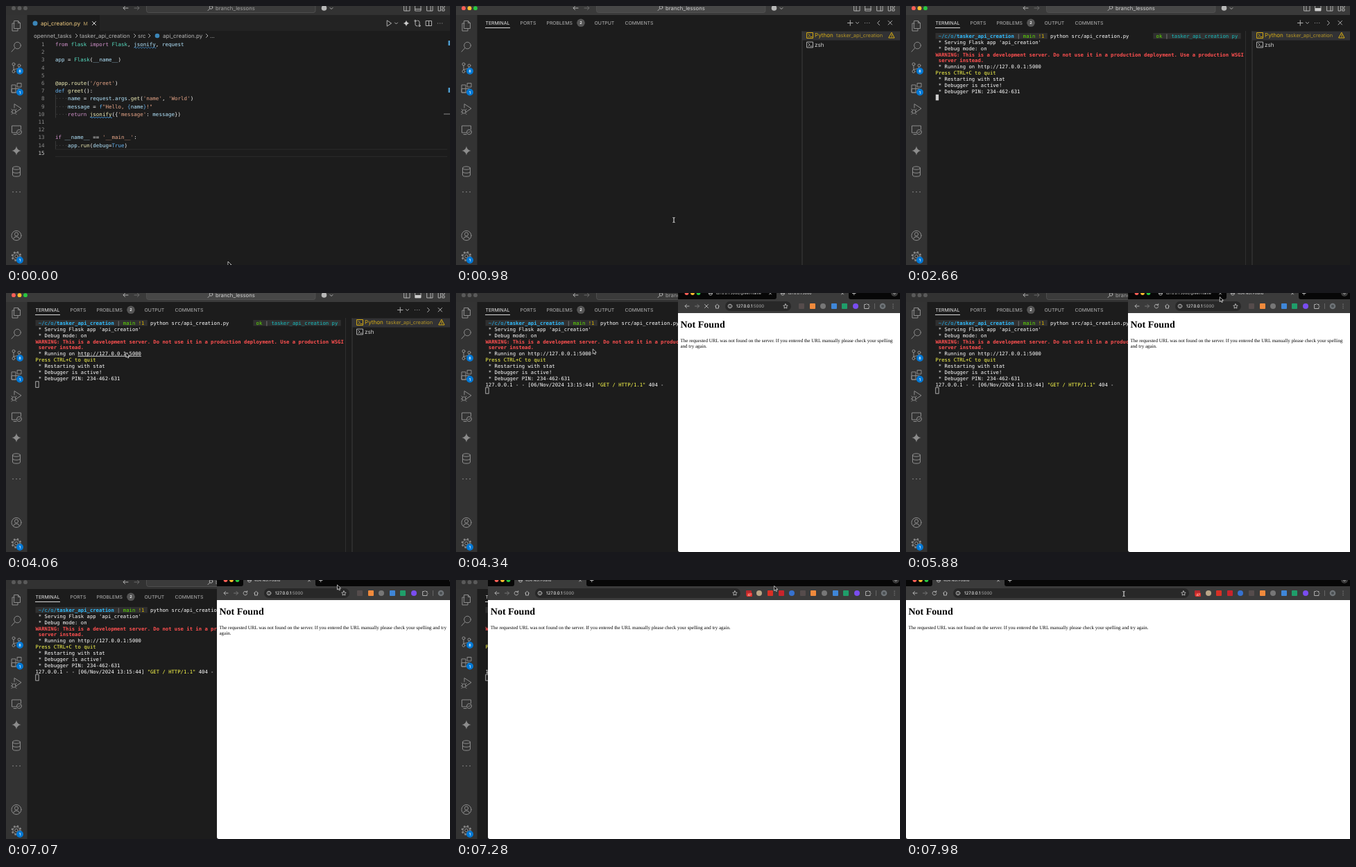
Animation, 640 px wide and 374 px high, one loop 8000 ms. Source, as an HTML page:

```html
<!DOCTYPE html>
<html lang="en">
<head>
<meta charset="utf-8">
<title>Running an API from the editor</title>
<style>
html, body { margin: 0; width: 100%; height: 100%; overflow: hidden; background: #1c1c1c; }
#stage { position: relative; width: 640px; height: 374px; overflow: hidden; text-rendering: geometricPrecision; }
#stage > svg { position: absolute; left: 0; top: 0; }
text { font-family: Inter, sans-serif; white-space: pre; fill: #b4b4b4; }
.mono text { font-family: "DejaVu Sans Mono", monospace; }
#code text { font-size: 7.53px; }
#term text { font-size: 7.24px; }
.line { fill: none; stroke: #b0b0b0; stroke-width: 1; stroke-linecap: round; stroke-linejoin: round; }
.badge text { font-size: 5.5px; font-weight: 600; fill: #fff; text-anchor: middle; }
.tabs text { font-size: 6.9px; }
.crumbs text { font-size: 8px; }

tspan.k { fill: #d292cc; } tspan.t { fill: #56dcc0; } tspan.v { fill: #b4e6ff; }
tspan.f { fill: #f2f0b8; } tspan.b { fill: #66b2f0; } tspan.s { fill: #e8a688; }
tspan.d { fill: #f4f4f4; } tspan.o { fill: #4a4a4a; }
tspan.w { fill: #fff; } tspan.r { fill: #ff5050; font-weight: bold; }
tspan.y { fill: #ffff4c; } tspan.c { fill: #1fb8fa; } tspan.C { fill: #2ebcff; font-weight: bold; }
tspan.g { fill: #5fe000; } tspan.m { fill: #a0a0a0; } tspan.a { fill: #e0b800; } tspan.e { fill: #14bcbe; }

#web { position: absolute; top: 0; height: 374px; background: #fff; overflow: hidden; border-radius: 0 0 0 3px; }
#strip { position: absolute; left: 0; right: 0; top: 0; height: 9px; background: #070707; }
#bar { position: absolute; left: 0; right: 0; top: 9px; height: 20px; background: #3b3b3b; }
#pill { position: absolute; left: 68px; top: 3px; height: 14px; border-radius: 7px; background: #282828; }
#web svg { position: absolute; top: 0; }
#web i { position: absolute; top: 6px; width: 8px; height: 8px; }
#page { position: absolute; left: 3.5px; right: 3.5px; top: 29px; color: #000; font: 7px/8px "Liberation Serif", serif; }
#page h1 { margin: 9.5px 0 0; font: bold 14px/16px "Liberation Serif", serif; }
#page p { margin: 10px 0 0; }
</style>
</head>
<body>
<div id="stage">
<svg width="640" height="374" viewBox="0 0 640 374">
  <rect width="640" height="374" fill="#1c1c1c"/>

  <g id="editor">
    <rect x="31" y="13" width="609" height="23" fill="#232323"/>
    <rect x="31" y="13" width="104" height="24" fill="#1c1c1c"/>
    <circle cx="42" cy="25" r="3.5" fill="#3b86b8"/>
    <text x="50" y="27.8" font-size="8" style="fill:#efcb80">api_creation.py</text>
    <text x="111.5" y="27.6" font-size="7" style="fill:#c0a468">M</text>
    <path class="line" d="M124.5 22.5l5 5m0-5l-5 5" style="stroke:#ddd"/>
    <g class="crumbs">
      <text x="40" y="45.8">opennet_tasks</text><text x="106" y="45.8">tasker_api_creation</text>
      <text x="190" y="45.8">src</text><text x="226" y="45.8">api_creation.py</text><text x="294" y="45.8">...</text>
      <circle cx="218" cy="43" r="3.3" fill="#3b86b8"/>
      <path class="line" stroke-width=".8" d="M100.5 40.5l2.5 2.5l-2.5 2.5M184.5 40.5l2.5 2.5l-2.5 2.5M205.5 40.5l2.5 2.5l-2.5 2.5M288.5 40.5l2.5 2.5l-2.5 2.5"/>
    </g>
    <g class="line">
      <path d="M549.5 21l6 4l-6 4zM560.5 24l2 2l2-2M590 22v5q0 2 3 2M596 28v-5q0-2-3-2M605.5 21.5h8v7h-8zM609.5 21.5v7"/>
      <circle cx="590" cy="21.5" r="1.2"/><circle cx="596" cy="28.5" r="1.2"/>
    </g>
    <path d="M577 20.5q.7 3.8 4.5 4.5q-3.8.7-4.5 4.5q-.7-3.8-4.5-4.5q3.8-.7 4.5-4.5z" fill="#ccc"/>
    <path d="M622.5 25h.1m3 0h.1m3 0h.1" class="line" stroke-width="1.3"/>
    <path d="M71 207H636M71 217.3H636" stroke="#2b2b2b"/>
    <path d="M71.5 128v33.5M71.5 195v11.5" stroke="#454545" stroke-width=".7"/>
    <g id="code" class="mono"></g>
    <path id="squiggle" fill="none" stroke="#4aa5f0" stroke-width=".8"/>
    <path d="M637.5 50h2.5v7h-2.5zM637.5 118h2.5v7h-2.5z" fill="#4c97c8"/>
    <path d="M631 156h9" stroke="#8a8a8a"/>
  </g>

  <g id="panel">
    <g class="tabs">
      <text x="42.5" y="27" style="fill:#e7e7e7">TERMINAL</text><text x="92.5" y="27">PORTS</text>
      <text x="130.5" y="27">PROBLEMS</text><text x="199.5" y="27">OUTPUT</text><text x="243.5" y="27">COMMENTS</text>
    </g>
    <path d="M42 31.5h36" stroke="#d8d8d8"/>
    <g class="badge"><circle cx="180" cy="24.3" r="5.8" fill="#555"/><text x="180" y="26.3">2</text></g>
    <path class="line" d="M564.5 24.5h7.5m-3.75-3.75v7.5M576.5 23.5l2 2l2-2M623 21.5l5.5 5.5m0-5.5l-5.5 5.5"/>
    <path class="line" stroke-width="1.3" d="M589.5 24.5h.1m3 0h.1m3 0h.1"/>
    <path class="line" id="chevron"/>
    <rect x="499" y="36.5" width="141" height="13" fill="#323234"/>
    <path d="M499 36v338" stroke="#3d3d3d"/>
    <path class="line" style="stroke:#d6ac14" stroke-width=".8" d="M506 38.5h8.5v8h-8.5zM508 40.5l2 2l-2 2M511 44.5h2M628 38.5l4 7.5h-8zM628 41.5v1.8m0 1.2v.1"/>
    <text x="517" y="45.4" font-size="8.1" style="fill:#d6ac14">Python</text>
    <text x="548" y="45.4" font-size="7.4" style="fill:#b09226">tasker_api_creation</text>
    <path class="line" stroke-width=".8" d="M506 52h8.5v8h-8.5zM508 54l2 2l-2 2M511 58h2"/>
    <text x="517" y="58.8" font-size="8.1" style="fill:#d4d4d4">zsh</text>
    <g id="shell">
      <path d="M489.5 36v338" stroke="#2f2f2f"/>
      <path d="M42.5 39h161.3v8.5h-161.3zM356.3 39h126.4v8.5h-126.4z" fill="#303030"/>
      <g id="term" class="mono"></g>
      <path id="link" d="M103.5 91.3h91.5" stroke="#fff" stroke-width=".8"/>
      <rect id="caret" width="4.3" height="8.5" stroke-width=".8"/>
    </g>
  </g>

  <rect width="30.5" height="374" fill="#333"/>
  <rect id="title" width="640" height="13"/>
  <g id="lights"><circle cx="11" cy="3.2" r="2.9"/><circle cx="19.5" cy="3.2" r="2.9"/><circle cx="28" cy="3.2" r="2.9"/></g>
  <path class="line" d="M176 3h-7l2.5-2.5M169 3l2.5 2.5"/>
  <path class="line" style="stroke:#6a6a6a" d="M185 3h7l-2.5-2.5M192 3l-2.5 2.5"/>
  <rect id="search" x="202.5" y="-6" width="243.5" height="15.5" rx="3" stroke="#555" stroke-width=".8"/>
  <circle class="line" cx="295.5" cy="2" r="2.3" stroke-width=".8"/><path class="line" stroke-width=".8" d="M293.8 3.8l-2.8 2.8"/>
  <text id="project" x="302" y="5.6" font-size="7.7">branch_lessons</text>
  <circle cx="458.5" cy="3" r="3.8" fill="#b8b8b8"/>
  <path class="line" d="M467 2.5l2 2l2-2M574 -1h8v8h-8zM577 -1v8M590 -1h8v8h-8zM590 4.5h8M607 -1h8v8h-8zM612 -1v8M623.5 -1h3v8h-3zM629 -1h3v3h-3zM629 4h3v3h-3z"/>
  <path id="panelMark" d="M590 3h8v4h-8z" fill="#ccc"/>

  <g class="line" style="stroke:#8c8c8c">
    <path d="M12 21.5h5.5l3 3v8h-8.5zM12 25h-3v11h8v-3.5M17.5 21.5v3h3"/>
    <circle cx="16.5" cy="57" r="4.8"/><path d="M13 60.5l-5 5.5"/>
    <circle cx="11" cy="84" r="2"/><circle cx="19" cy="86" r="2"/><circle cx="11" cy="94.5" r="2"/><path d="M11 86v6.5M19 88q0 3-8 3.5"/>
    <path d="M8.5 114h5.5v11h-5.5zM8.5 119.5h11v5.5h-11zM16.5 111.5h5.5v5.5h-5.5z"/>
    <path d="M12 147v-5.5l10 6.5l-6 4"/><circle cx="11.5" cy="152.5" r="2.7"/><path d="M8 149l1.5 1.5m4 0l1.5-1.5M7.5 153h1.5m5 0h1.5M8 156.5l1.5-1.5m4 0l1.5 1.5"/>
    <path d="M15 183h-6.5v-10h13v5M11 185.5h4"/><circle cx="19" cy="182" r="3.5"/><path d="M17.5 182l1 1l2-2"/>
    <ellipse cx="15" cy="234" rx="5.5" ry="2.2"/><path d="M9.5 234v10q0 2.2 5.5 2.2t5.5-2.2v-10M9.5 239q0 2.2 5.5 2.2t5.5-2.2"/>
    <path stroke-width="1.6" d="M10 268.5h.1m4.9 0h.1m4.9 0h.1"/>
    <circle cx="15" cy="331.5" r="7"/><circle cx="15" cy="329.5" r="2.6"/><path d="M10.5 336.5q1-3.5 4.5-3.5t4.5 3.5"/>
    <circle cx="15" cy="361.5" r="2.3"/><circle cx="15" cy="361.5" r="5"/><circle cx="15" cy="361.5" r="6.3" stroke-width="2" stroke-dasharray="2.5 2.45" stroke-linecap="butt"/>
  </g>
  <path d="M15 202.5q1 5.5 6.5 6.5q-5.5 1-6.5 6.5q-1-5.5-6.5-6.5q5.5-1 6.5-6.5z" fill="#8c8c8c"/>
  <g class="badge" fill="#0078d4">
    <circle cx="20" cy="94" r="5"/><text x="20" y="96">8</text>
    <circle cx="20" cy="124.5" r="5"/><text x="20" y="126.5">1</text>
    <circle cx="20" cy="367" r="5"/><text x="20" y="369">1</text>
  </g>
</svg>

<div id="web">
  <div id="strip">
    <svg width="300" height="9">
      <circle cx="12.5" cy="0" r="2.9" fill="#ff5f57"/><circle cx="21" cy="0" r="2.9" fill="#febc2e"/><circle cx="29.5" cy="0" r="2.9" fill="#28c840"/>
      <path id="active" fill="#3b3b3b"/>
      <g id="tabs" font-size="5.25"></g>
      <path class="line" id="plus"/>
    </svg>
    <svg width="16" height="9" style="right:0"><circle cx="8" cy="0" r="5" fill="#3b3b3b"/><path class="line" stroke-width=".8" d="M6.3 0l1.7 1.7l1.7-1.7"/></svg>
  </div>
  <div id="bar">
    <div id="pill"></div>
    <svg width="160" height="20">
      <path class="line" d="M16 10h-6l2.5-2.5M10 10l2.5 2.5"/>
      <path class="line" style="stroke:#777" d="M24.5 10h6l-2.5-2.5M30.5 10l-2.5 2.5"/>
      <path class="line" id="reload"/>
      <path class="line" d="M53.5 10l3-2.7l3 2.7M54.5 9.5v3.5h4v-3.5"/>
      <circle class="line" cx="75" cy="10" r="2.8" stroke-width=".8"/><path class="line" stroke-width=".8" d="M75 10v1.3M75 8.5v.1"/>
      <text x="84" y="12.2" font-size="6.1" style="fill:#fff">127.0.0.1<tspan fill="#a8a8a8">:5000</tspan></text>
    </svg>
    <svg id="star" width="10" height="20"><path class="line" stroke-width=".7" d="M5 6.8l1 2.1l2.2.3l-1.6 1.6l.4 2.3l-2-1.1l-2 1.1l.4-2.3l-1.6-1.6l2.2-.3z"/></svg>
    <svg width="56" height="20" style="right:0">
      <path class="line" d="M5 7.5h2q1-2 2 0h2v2q2 1 0 2v2h-6z"/>
      <path d="M19.5 6v8" stroke="#666"/>
      <circle cx="31" cy="10" r="4.3" fill="#6f7478"/><circle cx="31" cy="10" r="2" fill="#4a4f52"/>
      <path d="M46 7.2h.1m-.1 2.8h.1m-.1 2.8h.1" class="line" stroke-width="1.3"/>
    </svg>
  </div>
  <div id="page"><h1>Not Found</h1><p>The requested URL was not found on the server. If you entered the URL manually please check your spelling and try again.</p></div>
</div>

<svg width="640" height="374">
  <g id="mouse">
    <path id="arrow" d="M0 0v7l1.7-1.5l1.1 2.4l1.2-.5l-1.1-2.4h2.2z" fill="#000" stroke="#fff" stroke-width=".7"/>
    <path id="beam" d="M-1.5-3.5q1.5 0 1.5 1v5q0 1-1.5 1M1.5-3.5q-1.5 0-1.5 1M0 2.5q0 1 1.5 1" fill="none" stroke="#eee"/>
  </g>
</svg>
</div>

<script>
const LOOP = 8000, CELL = 4.358, ROW = 8.87;
const el = id => document.getElementById(id);
const show = (id, on) => el(id).style.display = on ? '' : 'none';

// "§x" switches to colour class x
const spans = s => s.split('§').slice(1).map(p => `<tspan class="${p[0]}">${p.slice(1)}</tspan>`).join('');
const text = (x, y, s, attr = '') => `<text x="${x}" y="${y}" ${attr}>${spans(s)}</text>`;

const source = [
  '§kfrom §tflask §kimport §tFlask§d, §vjsonify§d, §vrequest', '',
  '§vapp §d= §tFlask§d(§v__name__§d)', '', '',
  "§f@app.route§d(§s'/greet'§d)",
  '§bdef §fgreet§d():',
  "§o····§vname §d= §vrequest§d.§vargs§d.§fget§d(§s'name'§d, §s'World'§d)",
  '§o····§vmessage §d= §bf§s"Hello, §b{§vname§b}§s!"',
  "§o····§kreturn §fjsonify§d({§s'message'§d: §vmessage§d})", '', '',
  "§kif §v__name__ §d== §s'__main__'§d:",
  '§o····§vapp§d.§frun§d(§vdebug§d=§bTrue§d)', ''
];
el('code').innerHTML = source.map((s, i) => {
  const y = 57.9 + i * 11.21;
  const color = i === 14 ? '#d0d0d0' : '#8c8c8c';
  return `<text x="55.5" y="${y}" text-anchor="end" style="fill:${color}">${i + 1}</text>` + text(71, y, s);
}).join('');
const wave = (x, y) => `M${x} ${y}` + 'q1 -1.6 2 0t2 0'.repeat(8);
el('squiggle').setAttribute('d', wave(184.5, 60.2) + wave(121, 161));

const command = 'python src/api_creation.py';
const output = [
  "§w * Serving Flask app 'api_creation'",
  '§w * Debug mode: on',
  '§rWARNING: This is a development server. Do not use it in a production deployment. Use a production WSGI',
  '§r server instead.',
  '§w * Running on http://127.0.0.1:5000',
  '§yPress CTRL+C to quit',
  '§w * Restarting with stat',
  '§w * Debugger is active!',
  '§w * Debugger PIN: 234-462-631',
  '§w127.0.0.1 - - [06/Nov/2024 13:15:44] §y"GET / HTTP/1.1"§w 404 -'
];
const rowY = i => 46 + i * ROW;
el('term').innerHTML =
  text(42.5, rowY(0), '§c ~/c/o/§Ctasker_api_creation§m | §gmain §a!1 ') +
  text(42.5 + 72 * CELL, rowY(0), '§g ok§m | §etasker_api_creation py ') +
  text(42.5 + 38 * CELL, rowY(0), '§w', 'id="typed"') +
  output.map((s, i) => text(42.5, rowY(i + 1), s, `id="out${i}"`)).join('');

// Toolbar buttons, right to left; the last five need a wide window
const buttons = ['#7a4df0', '#1f9e6a', '#3f86d8', '#777', '#f08a3c', '#554c4c', '#3672d0', '#c8242c', '#d93025', '#b9a688', '#b3282d'];
el('bar').insertAdjacentHTML('beforeend', buttons.map((c, k) =>
  `<i id="button${k}" style="right:${60 + 15.6 * k}px;background:${c};border-radius:${k % 3 ? 1 : 4}px"></i>`).join(''));
el('button10').innerHTML = '<svg width="9" height="9" style="left:0"><rect x="1" y="3.5" width="8" height="5.5" rx="1" fill="#e0342c"/><text x="2.2" y="8" font-size="4.5" style="fill:#fff">47</text></svg>';

const tab = (x, title) => `<circle class="line" cx="${x + 9}" cy="0.5" r="2.6" stroke-width=".8"/>
  <path class="line" stroke-width=".8" d="M${x + 6.5} .5h5M${x + 93.5} -1l3 3m0-3l-3 3"/>
  <text x="${x + 16}" y="2.4" style="fill:#ddd">${title}</text>`;

let tabState = '';
function drawTabs(state) {
  if (state === tabState) return;
  tabState = state;
  const two = state !== 'single', x = two ? 142 : 38;
  const title = state === 'loading' ? '127.0.0.1:5000' : '404 Not Found';
  el('tabs').innerHTML = (two ? tab(38, '127.0.0.1:5000/greet?name') : '') + tab(x, title);
  el('active').setAttribute('d', `M${x - 3} 9q3 0 3-3v-6h104v6q0 3 3 3z`);
  el('plus').setAttribute('d', `M${x + 109.5} .5h4.5m-2.25-2.25v4.5`);
  el('reload').setAttribute('d', state === 'loading'
    ? 'M38.5 7.5l5 5m0-5l-5 5' : 'M43.3 8.5a2.8 2.8 0 1 0 .4 2.3M43.7 6.7v2h-2');
}

// Eased position along [time, a, b] keys
function track(keys, t) {
  let i = 0;
  while (i < keys.length - 2 && t >= keys[i + 1][0]) i++;
  const [p, q] = [keys[i], keys[i + 1]];
  const u = Math.min(1, Math.max(0, (t - p[0]) / (q[0] - p[0])));
  const e = u * u * (3 - 2 * u);
  return [1, 2].map(k => p[k] + (q[k] - p[k]) * e);
}
const mousePath = [[70, 320, 369], [800, 314, 309], [2940, 314, 309], [3640, 173, 86], [4270, 173, 86],
  [4620, 400.5, 38], [5250, 440, 88], [5460, 440, 88], [5950, 453, 1], [6090, 453, 1],
  [6250, 420, 14], [6650, 477.5, 7], [7140, 477.5, 7], [7770, 330, 19], [7980, 314, 20]];
const edges = [[7000, 320, 640], [7070, 304, 652], [7350, 0, 640]];

function render(t) {
  const active = t >= 350 && t < 4270;
  const panel = t >= 770;
  show('editor', !panel);
  show('panel', panel);
  show('panelMark', t >= 1120);
  show('shell', t >= 1120);
  el('title').setAttribute('fill', active ? '#3a3a3a' : '#323232');
  el('search').setAttribute('fill', active ? '#474747' : '#3b3b3b');
  el('project').style.fill = active ? '#d0d0d0' : '#a0a0a0';
  const colors = active ? ['#ff5f57', '#febc2e', '#28c840'] : ['#5a5a5a', '#5a5a5a', '#5a5a5a'];
  [...el('lights').children].forEach((c, i) => c.setAttribute('fill', colors[i]));
  el('chevron').setAttribute('d', t < 1120 ? 'M610.5 21.5l-3 3l3 3' : 'M607.5 21.5l3 3l-3 3');

  const typed = Math.round(command.length * Math.min(1, Math.max(0, (t - 1400) / 700)));
  el('typed').firstChild.textContent = command.slice(0, typed);
  const lines = t < 2240 ? 0 : t < 2380 ? 6 : t < 2520 ? 7 : t < 4340 ? 9 : 10;
  output.forEach((_, i) => show('out' + i, i < lines));
  show('link', t >= 3640 && t < 4270);
  const caret = el('caret'), focused = t < 3780;
  caret.setAttribute('x', lines ? 42.8 : 42.5 + (38 + typed) * CELL);
  caret.setAttribute('y', 39.1 + (lines ? lines + 1 : 0) * ROW);
  caret.setAttribute('fill', focused ? '#d0d0d0' : 'none');
  caret.setAttribute('stroke', focused ? 'none' : '#d0d0d0');

  show('web', t >= 4340);
  drawTabs(t < 4690 ? 'loading' : t < 6020 ? 'pair' : 'single');
  const [left, right] = track(edges, t);
  const width = right - left, count = width < 500 ? 6 : 11;
  el('web').style.left = left + 'px';
  el('web').style.width = width + 'px';
  buttons.forEach((_, k) => show('button' + k, k < count));
  const pillRight = count === 6 ? 157 : 232;
  el('pill').style.right = pillRight + 'px';
  el('star').style.right = pillRight + 3 + 'px';

  const [x, y] = track(mousePath, t);
  const beam = t >= 770 && t < 3600 || t >= 7600;
  show('mouse', t < 1400 || t >= 2940);
  show('beam', beam);
  show('arrow', !beam);
  el('mouse').setAttribute('transform', `translate(${x} ${y})`);
}

function frame() {
  render(performance.now() % LOOP);
  requestAnimationFrame(frame);
}
frame();
</script>
</body>
</html>
```
